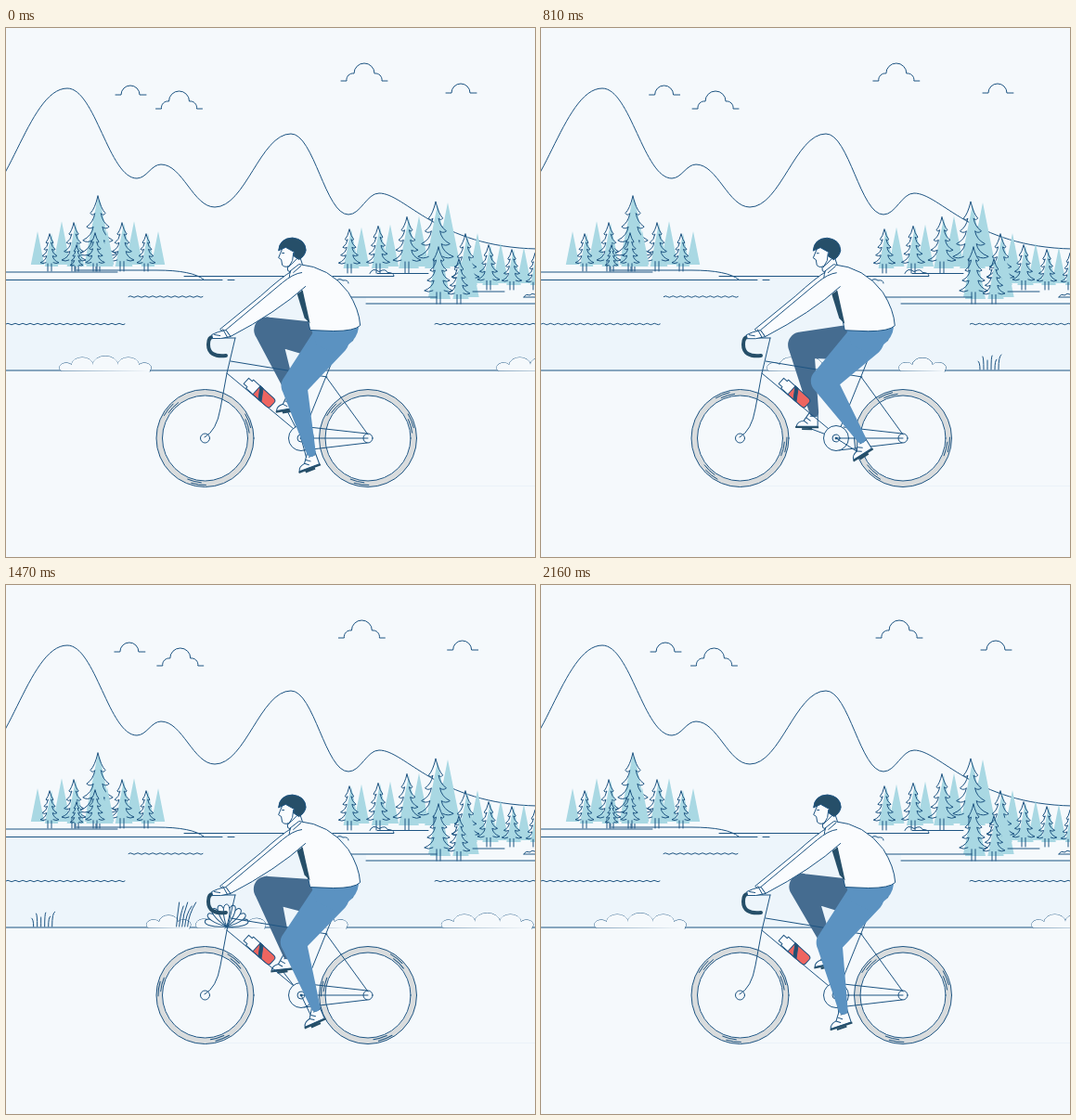
These frames come from a looping animation (570 px wide and 570 px high, 2190 ms). An HTML page:

```html
<!DOCTYPE html>
<html lang="en">
<head>
<meta charset="utf-8">
<title>Lakeside ride</title>
<style>
html, body { margin: 0; width: 100%; height: 100%; overflow: hidden; background: #f5f9fc; }
svg { display: block; width: 570px; height: 570px; }
.line { fill: none; stroke: #1d5482; stroke-width: 1; stroke-linecap: round; stroke-linejoin: round; }
.land { fill: #f5f9fc; }
.white { fill: #fafcfe; }
.teal { fill: #a9d8e3; }
.dark { fill: #264f69; }
.near { fill: #5b92c1; }
.far { fill: #456c90; }
</style>
</head>
<body>
<svg viewBox="0 0 570 570">
  <path fill="#edf5fb" d="M0 268H570V369H0Z"/>
  <path id="hills" class="line"/>
  <path class="land" d="M0 263H180Q201 263 213 271H0ZM364 268V255H570V296H388V290H364Z"/>
  <g id="clouds" class="line"></g>
  <g id="trees"></g>
  <path class="line" d="M0 263H120M76 261H162Q201 261 213 271M0 271.500H233M239 271.500H246M192 267.500H418q0-4-7-4-2-5-9-1-7-5-10 2M346 275q4-4 9-2 4-4 8-1 6-1 6 3M400 264.500H455M364 290H464M388 297H570M503 284H537M558 290q2-4 6-2 3-3 6-1M558 290H570"/>
  <g id="ripples" class="line"></g>
  <path class="land" d="M0 369H570V570H0Z"/>
  <path class="line" d="M0 369H570"/>
  <g id="plants" class="line"></g>
  <path stroke="#eaf2f9" d="M200 493.500H570"/>

  <path class="dark" d="M352 338L375 331 374 337 356 344Z"/>
  <g id="farLeg"></g>
  <g id="bike" class="line">
    <path d="M247 334L238 372 231 410Q227 434 214 441M232 334H247M242 359L346 376M238 372L316 437M358 343L318 442M345 376L390 438M326 430L389 437M321 455L389 447"/>
    <circle class="land" cx="318" cy="442" r="13.500"/>
    <circle class="land" cx="318" cy="442" r="4"/>
    <circle class="dark" cx="318" cy="442" r="1"/>
    <path d="M318 442H390"/>
    <g transform="translate(273 393) rotate(42)">
      <path class="white" d="M-19-4H-14V-6H0V6H-14V4H-19Z"/>
      <path fill="#ee6560" d="M-4-6H15Q19-6 19-3V3Q19 6 15 6H-4Z"/>
      <path class="dark" d="M-4-6H0L8 6H4Z"/>
    </g>
  </g>
  <g id="nearLeg"></g>
  <path fill="none" stroke="#264f69" stroke-width="4" stroke-linecap="round" d="M224 333Q218 332 218 341 218 355 237 353"/>
  <g id="rider" class="line">
    <path class="white" d="M302 249L303 262 316 268 319 256 316 247Z"/>
    <path class="white" d="M298 236L293 248 296 250 297 256Q301 260 307 255L316 246 312 236Z"/>
    <path class="dark" d="M293 240Q294 227 308 226.500 322 228 322.500 240 321 247 315 250L309 246 310 242 301 237Z"/>
    <path d="M309 243L308 251 304 258M297 243H299"/>
    <path class="white" d="M308 262Q296 269 274 289L230 325 235 329 300 286Z"/>
    <path class="white" d="M306 262L315 255Q348 258 368 285 380 304 381 321 375 327 352 327L327 326 318 283Q300 280 306 262Z"/>
    <path class="dark" stroke="none" d="M313 287L319 283 327 319 321 313Z"/>
    <path class="white" d="M318 264Q309 265 297 275L236 326 241 333Q291 307 322 279"/>
    <path class="white" d="M236 326L228 328 221 331 222 335 231 335 241 333Z"/>
    <path d="M309 264L317 257M233 325L238 334M224 331L230 332"/>
  </g>
</svg>
<script>
const $ = id => document.getElementById(id);
const TAU = 2 * Math.PI, RAD = Math.PI / 180, LOOP = 2190, STEP = 30, TILE = 1140;
const path = (cls, d, extra = '') => `<path class="${cls}" d="${d}" ${extra}/>`;
const repeat = (n, make) => Array.from({ length: n }, (_, i) => make(i)).join('');

// Ridge line through its peaks and valleys
const ridge = [[-42, 196], [66, 65], [141, 162], [167, 147], [225, 193], [307, 114], [369, 201], [402, 178]];
$('hills').setAttribute('d', ridge.reduce((d, [x, y], i) => {
  if (!i) return `M${x} ${y}`;
  const [px, py] = ridge[i - 1], k = (x - px) * .4;
  return d + `C${px + k} ${py} ${x - k} ${y} ${x} ${y}`;
}, '') + 'C430 178 465 236 572 238');

const cloud = (x, y) => path('', `M${x} ${y}h6a7 7 0 0 1 8-8a11 11 0 0 1 22 0a7 7 0 0 1 8 8h6`);
const puff = (x, y) => path('', `M${x} ${y}h6a9.500 9.500 0 0 1 20 0h7`);
$('clouds').innerHTML = puff(118, 72) + cloud(161.5, 87) + cloud(361, 57) + puff(474, 70);

// Conifers
const cone = (x, base, h) => path('teal', `M${x} ${base - h}l${h * .2} ${h}h${-h * .4}Z`);
function tree(x, base, h) {
  const side = s => `M${x} ${base - h}` + repeat(4, i => {
    const y = base - h * (.77 - .18 * i), out = h * (.1 + .05 * i) * s;
    return `Q${x + out * .4} ${y - h * .06} ${x + out} ${y}q${-out * .3} ${h * .04} ${-out * .6} 0`;
  });
  return path('line', side(-1) + side(1) + `M${x - 2} ${base}v${-h * .2}M${x + 2} ${base}v${-h * .2}`);
}
// A row of trees, each with a pale cone behind it on the side away from mid
function grove(n, x, gap, base, height, mid = -1) {
  const each = make => repeat(n, i => make(x + gap * i, height(i), Math.sign(i - mid)));
  return each((x, h, side) => cone(x + 13 * side, base - 7, h * .9) + cone(x + 2, base - 5, h * .9)) +
    each((x, h) => tree(x, base, h));
}
$('trees').innerHTML =
  grove(5, 47, 26, 262, i => 81 - 29 * Math.sqrt(Math.abs(i - 2)), 2) +
  grove(2, 76, 20, 262, i => 28 + 13 * i, 0) +
  grove(4, 370, 31, 264, i => 47 + 3.3 * i * i) +
  grove(4, 495, 25, 282, i => 60 - 12 * Math.sqrt(i)) +
  grove(2, 466, 22, 297, i => 61 - 13 * i, 0);

const wave = (x, end, y) => path('', `M${x} ${y}` + 'q2 -1.500 4 0t4 0'.repeat((end - x) / 8));
$('ripples').innerHTML = wave(132, 212, 289.5) + wave(-8, 128, 319) + wave(462, 582, 319);

// Roadside plants
function bush(x, width) {
  const n = Math.round(width / 26) + 1;
  const size = i => Math.sin(Math.PI * (i + .6) / (n + .2)) + .15;
  let total = 0;
  for (let i = 0; i < n; i++) total += size(i);
  return path('land', `M${x} 369` + repeat(n, i => {
    const w = width * size(i) / total;
    return `a${w / 2} ${w * .35} 0 0 1 ${w} ${i ? i < n - 1 ? 0 : 6 : -6}`;
  }) + 'v1', 'style="paint-order:stroke"');
}
const reeds = x => path('', repeat(5, i => `M${x + 3 * i} 368q1-13 ${3 + 1.5 * i}-${26 - i % 2 * 4}`));
const petal = (x, angle) => path('land', 'M0 0C-5 -14 -4 -24 0 -24S5 -14 0 0',
  `transform="translate(${x} 368) rotate(${angle})"`);
const fern = x => repeat(9, i => petal(x, (i % 2 ? 1 : -1) * 19 * Math.ceil((8 - i) / 2)));
const grass = x => path('', repeat(6, i => `M${x + 4 * i} 368q0-${8 + i * 5 % 9} ${i - 2}-${9 + i * 5 % 9}`));
const plants = bush(59, 96) + bush(530, 70) + bush(672, 48) + grass(758) +
  bush(881, 45) + reeds(912) + bush(934, 30) + bush(972, 35) + fern(966) + bush(1049, 46);
$('plants').innerHTML = `<g>${plants}</g><g transform="translate(${-TILE})">${plants}</g>`;

// Wheels
const arc = (r, from, to) => {
  const p = a => `${r * Math.cos(a * RAD)} ${r * Math.sin(a * RAD)}`;
  return `M${p(from)}A${r} ${r} 0 0 1 ${p(to)}`;
};
const marks = repeat(3, i => arc(50.5, 89 + 120 * i, 107 + 120 * i) + arc(48, 95 + 120 * i, 113 + 120 * i));
const wheel = x => `<g transform="translate(${x} 442)"><circle r="49.300" stroke="#d9dcdd" stroke-width="6"/>
  <circle r="52.500"/><circle r="46"/><circle class="land" r="5"/>${path('spin', marks)}</g>`;
$('bike').insertAdjacentHTML('afterbegin', wheel(214.5) + wheel(390));

// Tapered limb between two joints
const limb = (p, q, r, s) => {
  const a = Math.atan2(q[1] - p[1], q[0] - p[0]) + Math.PI / 2, c = Math.cos(a), n = Math.sin(a);
  return `M${p[0] + r * c} ${p[1] + r * n}A${r} ${r} 0 0 1 ${p[0] - r * c} ${p[1] - r * n}` +
    `L${q[0] - s * c} ${q[1] - s * n}A${s} ${s} 0 0 1 ${q[0] + s * c} ${q[1] + s * n}Z`;
};
const shoe = path('line white', 'M-11 -1Q-10 -6 -3 -7L4 -17H12L12 -1Z') +
  path('line', 'M-3 -7L1 -4M0 -10L4 -7M4 -12H11') + path('dark', 'M-12 -1H13V1H-12ZM-5 1H6V3H-5Z');

// The pedal places the foot; the knee follows from the two bone lengths
function leg(deg, hip, cls) {
  const thigh = 64, shin = 74, a = deg * RAD;
  const pedal = [318 + 34 * Math.sin(a), 442 + 34 * Math.cos(a)];
  const tilt = -17 - 19 * Math.cos((deg - 95) * RAD);
  const c = Math.cos(tilt * RAD), s = Math.sin(tilt * RAD);
  const ankle = [pedal[0] + 8 * c + 16 * s, pedal[1] + 8 * s - 16 * c];
  const dx = ankle[0] - hip[0], dy = ankle[1] - hip[1], d = Math.hypot(dx, dy);
  const along = (d * d + thigh * thigh - shin * shin) / (2 * d);
  const bend = Math.sqrt(Math.max(0, thigh * thigh - along * along));
  const knee = [hip[0] + (dx * along - dy * bend) / d, hip[1] + (dy * along + dx * bend) / d];
  return path('line', `M318 442L${pedal}`) +
    `<g transform="translate(${pedal}) rotate(${tilt})">${shoe}</g>` +
    path(cls, limb(hip, knee, 20, 14) + limb(knee, ankle, 14, 5));
}

const drift = [-1.6, 1.8, -3.7, 2.3];
const clouds = [...$('clouds').children], spins = document.querySelectorAll('.spin');
const shift = (el, x, y = 0) => el.setAttribute('transform', `translate(${x} ${y})`);

function draw(now) {
  const t = Math.floor(now % LOOP / STEP) * STEP;
  const crank = 15 + .497 * t, sway = Math.cos(crank * RAD);
  const p = (1 - Math.cos(TAU * t / 2160)) / 2;
  clouds.forEach((c, i) => shift(c, drift[i] * p));
  shift($('ripples'), 1 - Math.cos(TAU * t / 720));
  shift($('plants'), t * TILE / 1080 % TILE);
  spins.forEach(s => s.setAttribute('transform', `rotate(${-t})`));
  $('farLeg').innerHTML = leg(crank + 192, [344, 338], 'far');
  $('nearLeg').innerHTML = leg(crank, [350, 335], 'near') +
    path('near', 'M328 322H380Q379 334 368 342L352 350 335 342Z');
  shift($('rider'), sway * .9 - .2, -sway * .5);
  requestAnimationFrame(() => draw(performance.now()));
}
draw(0);
</script>
</body>
</html>
```
